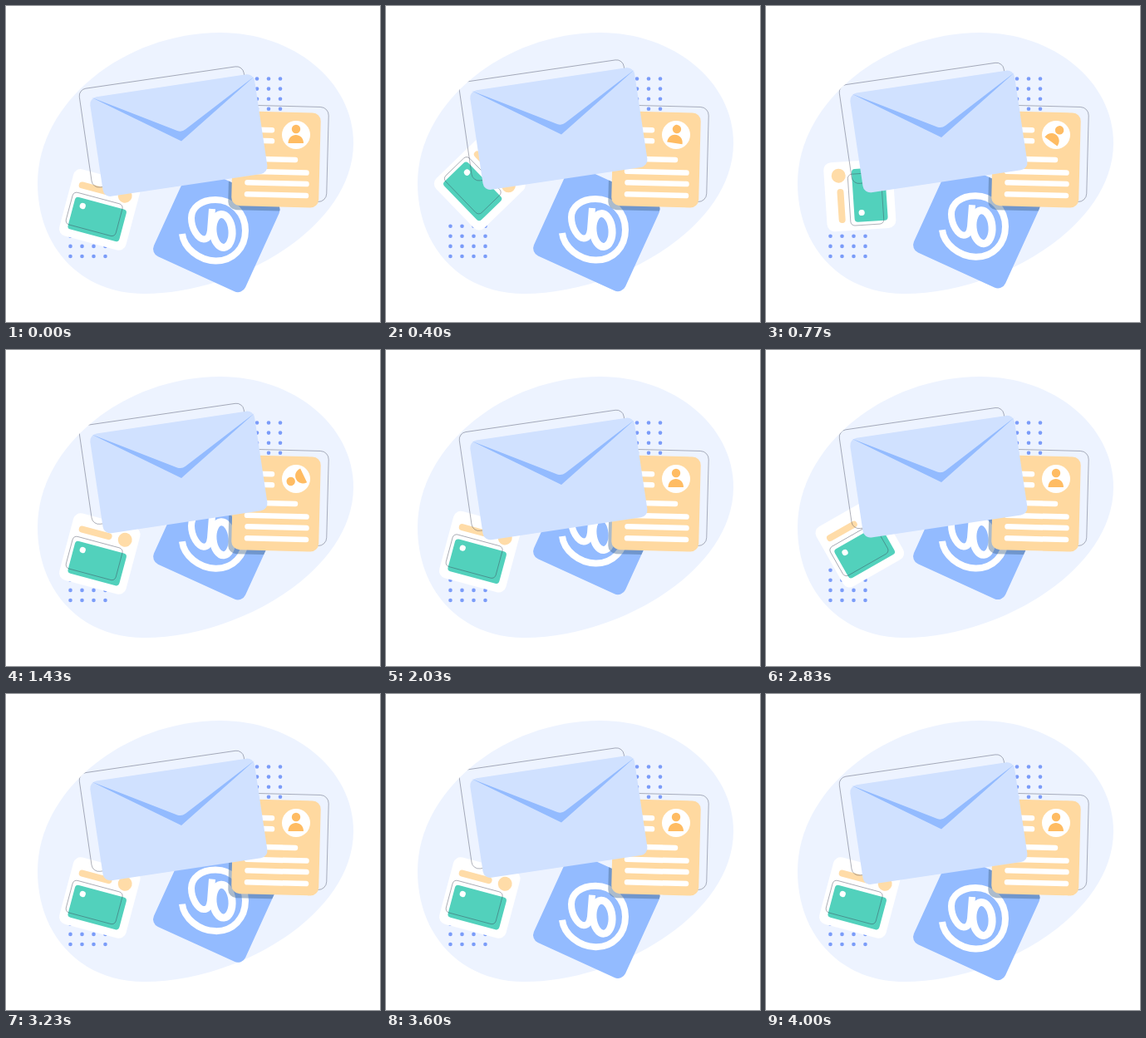
These frames come from a looping animation (450 by 380 pixels, 4.03 s). An HTML page:

```html
<!DOCTYPE html>
<html lang="en">
<head>
<meta charset="utf-8">
<title>Mail illustration</title>
<style>
html, body { margin: 0; width: 100%; height: 100%; overflow: hidden; background: #fff; }
svg { display: block; }
.line { fill: none; stroke: #3c4256; stroke-width: .4; }
.bars { stroke: #fff; stroke-width: 6.5; stroke-linecap: round; }
</style>
</head>
<body>
<svg width="450" height="380" viewBox="0 0 450 380">
  <defs>
    <path id="blob" d="M38 213C38 116 142 32 258 32C345 32 418 90 418 165C418 265 280 346 166 346C90 346 38 290 38 213Z"/>
    <clipPath id="inBlob"><use href="#blob"/></clipPath>
    <clipPath id="inTile"><rect id="tileClip" x="193" y="209" width="121" height="118" rx="10"/></clipPath>
  </defs>
  <use href="#blob" fill="#edf3ff"/>
  <g id="dots" fill="#7b9cf9"></g>

  <g id="tile">
    <rect x="193" y="209" width="121" height="118" rx="10" transform="rotate(24.5 252 268)" fill="#93bbff"/>
    <g fill="none" stroke="#fff" stroke-width="8">
      <path d="M212 274C214 291 232 306 252 306.500C273 307 288 291 288 270C288 249 272 233 252 233C234 233 223 243 223 255C223 268 231 280 238 280.500C243 280.500 245 277 246 270L248 244"/>
      <ellipse cx="260.500" cy="270.500" rx="11.500" ry="20" stroke-width="9" transform="rotate(-5 260.500 270.500)"/>
    </g>
  </g>
  <g clip-path="url(#inTile)">
    <rect width="105" height="114" rx="10" transform="translate(270 131) rotate(1.5)" fill="#46688f" opacity=".45"/>
  </g>

  <rect class="line" width="105" height="114" rx="10" transform="translate(283.500 119) rotate(1.5)"/>
  <rect width="105" height="114" rx="10" transform="translate(274 126) rotate(1.5)" fill="#ffd9a0"/>
  <path class="bars" d="M290 148.500L320 149.200M290 161.500L320 162.300M290 183.500L348 185M290 198.800L361.500 200.600M290.500 212.300L361.500 214.100M290 226.300L361 228.100"/>
  <circle cx="349" cy="155" r="17" fill="#fff"/>
  <g id="avatar" fill="#ffbc63">
    <circle cx="349" cy="148" r="5.200"/>
    <path d="M339.500 165C339.500 151.500 358 151.500 358 165Z"/>
  </g>

  <g id="note">
    <rect x="-41.500" y="-41.500" width="83" height="83" rx="9" fill="#fff"/>
    <rect x="-32" y="-27" width="41" height="8" rx="4" fill="#ffdca8"/>
    <circle cx="25" cy="-24" r="8.500" fill="#ffdca8"/>
    <rect x="-32" y="-8" width="64" height="40" rx="4" fill="#52d1bc"/>
    <circle cx="-21" cy="1" r="3.600" fill="#fff"/>
    <rect class="line" x="-36" y="-13" width="62" height="40" rx="5"/>
  </g>

  <g clip-path="url(#inBlob)">
    <rect id="frame" class="line" width="200" height="120" rx="9"/>
  </g>
  <g id="envelope">
    <rect width="200" height="121" rx="9" transform="translate(100 110.500) rotate(-8.500)" fill="#d0e1ff"/>
    <path d="M103 110L211 162.500L299 84.500L216 148.300Q211.500 152 206 150Z" fill="#93bbff"/>
  </g>
</svg>
<script>
const $ = id => document.getElementById(id);
const place = (id, value) => $(id).setAttribute('transform', value);

// Cubic Bezier easing with flat ends: handles at (a, 0) and (b, 1)
function ease(p, a, b) {
  let lo = 0, hi = 1, s = .5;
  for (let i = 0; i < 24; i++) {
    s = (lo + hi) / 2;
    const x = 3 * (1 - s) ** 2 * s * a + 3 * (1 - s) * s * s * b + s ** 3;
    if (x < p) lo = s; else hi = s;
  }
  return s * s * (3 - 2 * s);
}

const triangle = p => 1 - Math.abs(1 - 2 * (p % 1));

function addDots(x, y, cols, rows) {
  for (let i = 0; i < cols * rows; i++) {
    const cx = x + i % cols * 14, cy = y + Math.floor(i / cols) * 12.1;
    $('dots').insertAdjacentHTML('beforeend', `<circle cx="${cx}" cy="${cy}" r="2.300"/>`);
  }
}
addDots(288, 87.5, 4, 4);
addDots(77.5, 264.7, 4, 4);

function draw(ms) {
  const t = Math.min(ms / 1000, 4) % 4;

  const bob = -10 * triangle(t);
  place('envelope', `translate(0 ${bob})`);
  place('frame', `translate(87 ${100.5 + bob}) rotate(-8.3)`);

  const up = ease(t % 2 / 2, .93, .34);
  const lift = -50 * (t < 2 ? up : 1 - up);
  place('tile', `translate(0 ${lift})`);
  place('tileClip', `translate(0 ${lift}) rotate(24.5 252 268)`);

  const turn = t < 2 ? 360 * ease(t / 2, .86, .56) : 0;
  place('avatar', `rotate(${turn} 349 155)`);

  // The note hops with a full spin, then rests for a second
  const hop = t % 2 < 1 ? t % 2 : 0;
  place('note', `translate(112.8 ${245 - 38 * triangle(hop)}) rotate(${15 + 360 * ease(hop, .95, .62)})`);
}

const start = performance.now();
function tick() {
  draw((performance.now() - start) % 4030);
  requestAnimationFrame(tick);
}
tick();
</script>
</body>
</html>
```
